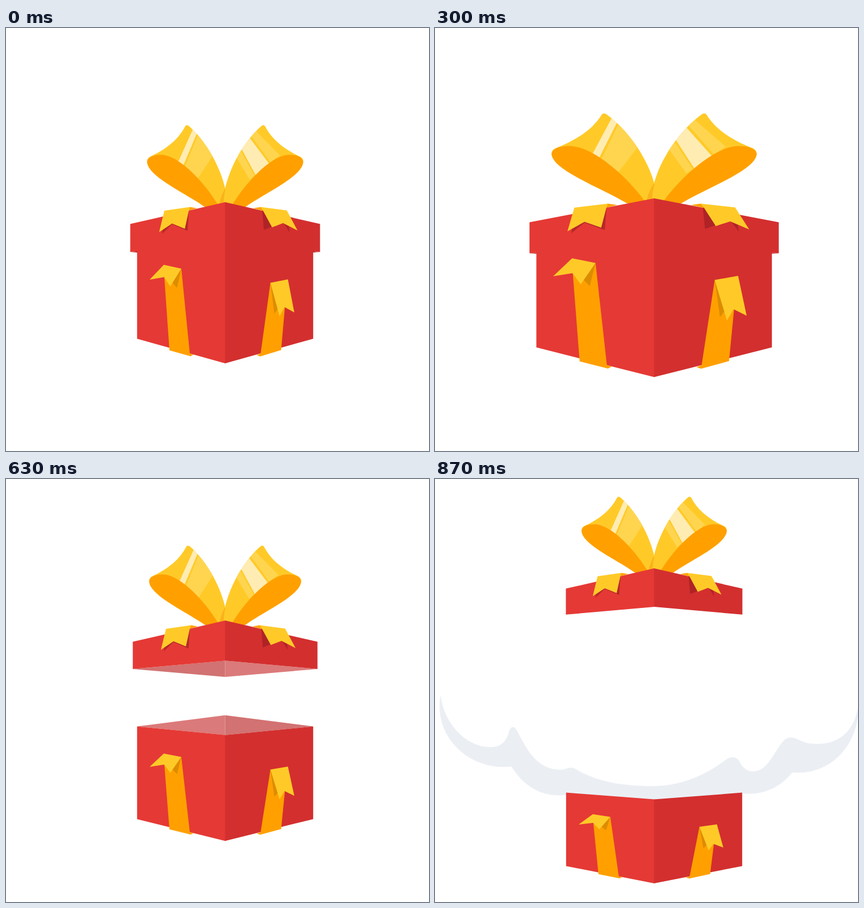
An HTML page for the animation above (1500 ms loop, 748 px wide and 748 px high).

```html
<!DOCTYPE html>
<html lang="en">
<head>
<meta charset="utf-8">
<title>Gift box</title>
<style>
  html, body { margin: 0; width: 100%; height: 100%; overflow: hidden; background: #fff; }
  svg { display: block; width: 100%; height: 100%; }
  .redL { fill: #e53935; }
  .redR { fill: #d32f2f; }
  .inA { fill: #c62828; }
  .inB { fill: #b71c1c; }
  .gold { fill: #ffca28; }
  .light { fill: #ffd54f; }
  .pale { fill: #ffecb3; }
  .orange { fill: #ffa000; }
  .fold { fill: #dd8c00; }
  .shadeL { fill: #b5282a; }
  .shadeR { fill: #af2327; }
  .cloud { fill: #ebeff4; }
</style>
</head>
<body>
<svg viewBox="0 0 748 748">
  <defs>
    <path id="loop" d="M317 173.5 Q320 169.5 325 174.7 C352 199 377 240 387.5 283 L391 312 L351 316
      C318 292 249 262 249.5 236 Q249.5 231 254 228 C284 214 305 197 317 173.5Z"/>
    <path id="inside" d="M249.5 236 C251 227 264 223 279 224.5 C305 228 345 265 374 311 L372 318 L351 316
      C318 292 249 262 249.5 236Z"/>
    <clipPath id="clipL"><use href="#loop"/></clipPath>
    <clipPath id="clipR"><use href="#loop" transform="matrix(-1 0 0 1 775 0)"/></clipPath>
  </defs>

  <path id="cloud" class="cloud" d="M10 381 C14 428 52 474 98 474 C119 474 127 462 131 446
    Q134 438 138.500 438.500 Q142 439 146 447 C164 481 181 514 222 514 C231 514 234 510 242 510.500
    Q247 511 254 516 C288 535 332 543 385 543 C437 543 482 521 512 498 Q519 492 526 492
    Q534 492 538 499 C543 508 549 517 562 517 C586 517 597 489 612 468 Q620 457 628 457
    C643 457 647 468.500 676 468.500 C716 468.500 742 444 748 403 V421
    C739 482 692 524 632 519 C611 544 583 560 543 556 L530 600 H250 L232 559
    C190 563 158 545 135 508.500 C65 516 8 464 8 402 Q8 391 10 381Z"/>

  <g class="body">
    <g class="inner">
      <path class="inA" d="M231.800 364.500 L387.500 342 V381.500Z"/>
      <path class="inB" d="M543.200 364.500 L387.500 342 V381.500Z"/>
    </g>
  </g>

  <g class="lid">
    <g class="inner">
      <path class="inB" d="M219.700 396 L387.500 381 V410.400Z"/>
      <path class="inA" d="M555.300 396 L387.500 381 V410.400Z"/>
    </g>
  </g>

  <g class="body">
    <path class="redL" d="M231.800 364.500 L388.500 381.500 V592.700 L387.500 593 L231.800 549.500Z"/>
    <path class="redR" d="M543.200 364.500 L387.500 381.500 V593 L543.200 549.500Z"/>
    <path class="orange" d="M280 441 L310 425.500 L325 575.500 L331.500 577.500 L326.500 580.500 L289 570Z"/>
    <path class="fold" d="M310 425.500 L302.500 459.500 L285 440Z"/>
    <path class="gold" d="M279 418.700 L310 425.500 L290.500 457 L279.500 440.500 L254 445Z"/>
    <path class="orange" d="M467.600 450.500 L493.300 492 L486.500 569.500 L449.600 580.800 L443.500 578.500 L450.300 575.500Z"/>
    <path class="fold" d="M467.600 450.500 L474.500 505 L484 492Z"/>
    <path class="gold" d="M467.600 450.500 L498.500 444.500 L509.800 503 L492.500 493.500 L483.800 510Z"/>
  </g>

  <g class="lid">
    <use href="#loop" class="gold"/>
    <g clip-path="url(#clipL)">
      <path class="pale" d="M330.900 178 L337.500 186.500 L313.600 243 L304 238Z"/>
      <path class="light" d="M340 188 L366 225 L338 268 L316 246Z"/>
    </g>
    <use href="#inside" class="orange"/>

    <use href="#loop" class="gold" transform="matrix(-1 0 0 1 775 0)"/>
    <g clip-path="url(#clipR)">
      <path class="light" d="M433 190 L441 181 L484 225 L468 238Z"/>
      <path class="pale" d="M430 193 L416 213 L441.500 260 L466 241Z"/>
      <path class="light" d="M414.500 216 L408 230 L431 268 L439.500 261Z"/>
    </g>
    <use href="#inside" class="orange" transform="matrix(-1 0 0 1 775 0)"/>
    <path fill="#fbb21a" d="M387.500 284 C383 291 379 302 377.500 311 H385 C385 301 386 292 388 286Z"/>

    <path class="redL" d="M219.700 346.500 L387.500 308 L388.500 308.200 V381 L219.700 396Z"/>
    <path class="redR" d="M555.300 346.500 L387.500 308 V381 L555.300 396Z"/>

    <path class="shadeL" d="M323.500 322 L321 358.800 L293.700 347 L276 364 L281 330Z"/>
    <path class="orange" d="M324.800 316.500 L337.800 318.800 L323 323Z"/>
    <path class="gold" d="M280 323 L325.500 316.500 L323.500 322 L316.200 355 L293.700 345.800 L270.800 361Z"/>
    <path class="shadeR" d="M453 322 L456 357 L490 343 L501.500 361.500 L497 328Z"/>
    <path class="orange" d="M437 318.800 L451 316.500 L455 323.500Z"/>
    <path class="gold" d="M450 316.500 L496.500 322.500 L515.500 358 L490 345 L470.500 352.500 L454 322Z"/>
  </g>
</svg>
<script>
  const LOOP = 1500, STEP = 30, END = 870, MID = 387.5;

  // time, y of the anchor, x scale, y scale
  const LID = [
    [0, 308, 1, 1],
    [180, 245, 1, 1.305],
    [360, 329.3, 1.47, 1],
    [480, 308, 1, 1],
    [END, 158, 0.93, 0.93]
  ];
  const BODY = [
    [0, 593, 1, 1],
    [180, 675, 1, 1.615],
    [240, 648, 1.167, 1.41],
    [360, 586.5, 1.508, 1],
    [480, 593, 1, 1],
    [END, 715, 1, 0.702]
  ];

  const clamp = v => Math.min(1, Math.max(0, v));

  function pose(keys, t) {
    let i = 1;
    while (i < keys.length - 1 && t > keys[i][0]) i++;
    const a = keys[i - 1], b = keys[i];
    const k = clamp((t - a[0]) / (b[0] - a[0]));
    return a.map((v, n) => v + (b[n] - v) * k);
  }

  const all = name => document.querySelectorAll(name);
  const lids = all('.lid'), bodies = all('.body'), inners = all('.inner');
  const cloud = document.getElementById('cloud');

  function place(parts, keys, t) {
    const [, y, sx, sy] = pose(keys, t);
    const move = `translate(${MID} ${y}) scale(${sx} ${sy}) translate(${-MID} ${-keys[0][1]})`;
    parts.forEach(p => p.setAttribute('transform', move));
  }

  function draw(ms) {
    const t = Math.min(END, Math.floor((ms % LOOP) / STEP) * STEP);
    place(lids, LID, t);
    place(bodies, BODY, t);
    const shown = 1 - clamp((t - 480) / (END - 480));
    inners.forEach(p => p.setAttribute('opacity', shown));
    cloud.setAttribute('opacity', clamp((t - 630) / 120));
  }

  const start = performance.now();
  function tick() {
    draw(performance.now() - start);
    requestAnimationFrame(tick);
  }
  tick();
</script>
</body>
</html>
```
